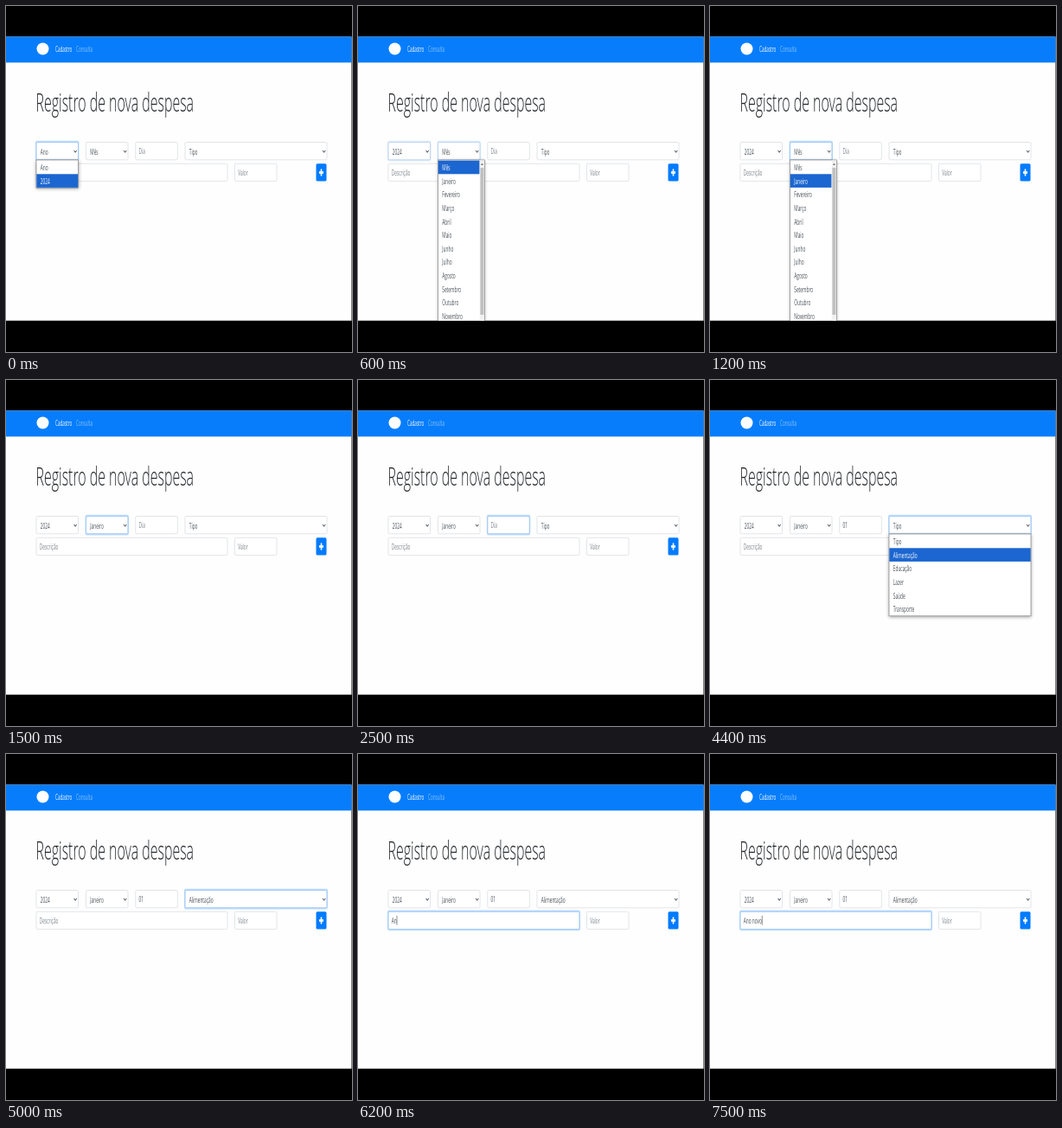
An HTML page with a canvas that plays this animation: 400x400 px, repeating every 8 s.

```html
<!DOCTYPE html>
<html lang="pt">
<head>
<meta charset="utf-8">
<style>
html, body { margin: 0; width: 100%; height: 100%; overflow: hidden; background: #000; }
canvas { display: block; width: 400px; height: 400px; }
</style>
</head>
<body>
<canvas></canvas>
<script>
const canvas = document.querySelector('canvas');
const ctx = canvas.getContext('2d');
const dpr = window.devicePixelRatio || 1;
canvas.width = canvas.height = 400 * dpr;

const LOOP = 8000;
const SQUEEZE = 0.545; // the whole page is shown narrowed
const ROW = 15.6;
const INK = '#495057', HINT = '#7b838a', BLUE = '#007bff', PICK = '#1b66d0';

const fields = {
  ano: [35, 157.5, 48.5],
  mes: [92.5, 157.5, 48.5],
  dia: [149.8, 157.5, 48.5],
  tipo: [207, 157.5, 164],
  desc: [35, 182.3, 221],
  valor: [264.5, 182.3, 48.5]
};
const focusOrder = [['ano', -1000], ['mes', 600], ['dia', 2000], ['tipo', 3800], ['desc', 5500]];
const months = ['Mês', 'Janeiro', 'Fevereiro', 'Março', 'Abril', 'Maio', 'Junho', 'Julho',
  'Agosto', 'Setembro', 'Outubro', 'Novembro', 'Dezembro'];
const types = ['Tipo', 'Alimentação', 'Educação', 'Lazer', 'Saúde', 'Transporte'];
const typed = 'Ano novo';
const keyTimes = [6000, 6200, 6400, 6500, 6800, 7000, 7300, 7500];

function rect(x, y, w, h, color) {
  ctx.fillStyle = color;
  ctx.fillRect(x, y, w, h);
}

function box(x, y, w, h, r) {
  ctx.beginPath();
  ctx.roundRect(x, y, w, h, r);
}

// Writes text and returns its drawn width
function text(str, x, y, color = INK, size = 8.8, weight = 400) {
  ctx.save();
  ctx.translate(x, y);
  ctx.scale(SQUEEZE, 1);
  ctx.font = `${weight} ${size}px "Open Sans", "Noto Sans", sans-serif`;
  ctx.fillStyle = color;
  ctx.fillText(str, 0, 0);
  const width = ctx.measureText(str).width * SQUEEZE;
  ctx.restore();
  return width;
}

// Two-step fade, 100 ms each
const ramp = (t, start) =>
  Math.min(1, Math.max(0, (Math.floor(t / 100) * 100 - start + 100) / 200));

function focusLevel(name, t) {
  const i = focusOrder.findIndex(f => f[0] === name);
  if (i < 0) return 0;
  const next = focusOrder[i + 1];
  return ramp(t, focusOrder[i][1]) * (next ? 1 - ramp(t, next[1]) : 1);
}

function field(name, t) {
  const [x, y, w] = fields[name], h = 20.3;
  const level = focusLevel(name, t);
  if (level) {
    box(x - 1, y - 1.7, w + 2, h + 3.4, 2);
    ctx.fillStyle = `rgba(0,123,255,${0.25 * level})`;
    ctx.fill();
  }
  box(x, y, w, h, 1.5);
  ctx.fillStyle = '#fff';
  ctx.fill();
  ctx.lineWidth = 0.6;
  ctx.strokeStyle = '#ced4da';
  ctx.stroke();
  if (level) {
    ctx.strokeStyle = `rgba(128,189,255,${level})`;
    ctx.stroke();
  }
}

function select(name, label, t) {
  field(name, t);
  const [x, y, w] = fields[name];
  text(label, x + 4.8, y + 14);
  ctx.beginPath();
  ctx.moveTo(x + w - 4.8, y + 9.4);
  ctx.lineTo(x + w - 3.3, y + 11.8);
  ctx.lineTo(x + w - 1.8, y + 9.4);
  ctx.lineWidth = 0.9;
  ctx.strokeStyle = '#343a40';
  ctx.stroke();
}

function popup(name, items, picked, width, scrollbar) {
  const x = fields[name][0], top = 178;
  const height = items.length * ROW + 1.2;
  ctx.save();
  ctx.shadowColor = 'rgba(0,0,0,.4)';
  ctx.shadowBlur = 4 * dpr;
  ctx.shadowOffsetY = dpr;
  rect(x, top, width, height, '#fff');
  ctx.restore();
  ctx.lineWidth = 0.7;
  ctx.strokeStyle = '#858585';
  ctx.strokeRect(x, top, width, height);
  const inner = scrollbar ? width - 5.5 : width;
  items.forEach((item, i) => {
    const y = top + 0.7 + i * ROW;
    if (i === picked) rect(x + 0.3, y, inner - 0.6, ROW, PICK);
    text(item, x + 4.8, y + 11.5, i === picked ? '#fff' : INK);
  });
  if (scrollbar) {
    rect(x + inner, top + 0.5, 5.2, height, '#f1f1f1');
    rect(x + inner + 0.6, top + 9, 4, 170, '#c1c1c1');
    ctx.beginPath();
    ctx.moveTo(x + inner + 1.2, top + 6);
    ctx.lineTo(x + inner + 2.6, top + 3.5);
    ctx.lineTo(x + inner + 4, top + 6);
    ctx.fillStyle = '#777';
    ctx.fill();
  }
}

function input(name, value, hint, t, caret) {
  field(name, t);
  const [x, y] = fields[name];
  const left = x + 3.7;
  const width = text(value || hint, left, y + 13.6, value ? INK : HINT);
  if (caret) rect(left + (value ? width : 0), y + 4.5, 0.6, 11, '#444');
}

function draw(t) {
  ctx.setTransform(dpr, 0, 0, dpr, 0, 0);
  rect(0, 0, 400, 400, '#000');
  ctx.save();
  ctx.beginPath();
  ctx.rect(0, 35.4, 399.5, 328.4);
  ctx.clip();
  rect(0, 35, 400, 330, '#fefefe');
  rect(0, 35, 400, 30.4, '#077dfc');
  ctx.beginPath();
  ctx.arc(42.5, 49.5, 7, 0, 7);
  ctx.fillStyle = '#fff';
  ctx.fill();
  text('Cadastro', 57, 53, '#fff', 8.5, 500);
  text('Consulta', 81, 53, 'rgba(255,255,255,.55)', 8.5);
  text('Registro de nova despesa', 34.6, 122, '#212529', 29.2, 300);

  select('ano', t < 300 ? 'Ano' : '2024', t);
  select('mes', t < 1400 ? 'Mês' : 'Janeiro', t);
  const day = t < 2600 ? '' : t < 2800 ? '0' : '01';
  input('dia', day, 'Dia', t, (t >= 2000 && t < 2500) || (t >= 2600 && t < 3300));
  select('tipo', t < 5000 ? 'Tipo' : 'Alimentação', t);
  const count = keyTimes.filter(k => t >= k).length;
  input('desc', typed.slice(0, count), 'Descrição', t, t >= 5600);
  input('valor', '', 'Valor', t);

  box(358.5, 182.2, 12, 20.4, 1.5);
  ctx.fillStyle = BLUE;
  ctx.fill();
  rect(363.7, 188.5, 1.6, 8, '#fff');
  rect(362, 191.2, 5, 2.6, '#fff');

  if (t < 300) popup('ano', ['Ano', '2024'], 1, 48.5);
  if (t >= 600 && t < 1400) popup('mes', months, t < 1200 ? 0 : 1, 53.8, true);
  if (t >= 3800 && t < 5000) popup('tipo', types, t < 4400 ? 0 : 1, 164);
  ctx.restore();
}

const start = performance.now();
function tick() {
  draw((performance.now() - start) % LOOP);
  requestAnimationFrame(tick);
}
tick();
</script>
</body>
</html>
```
